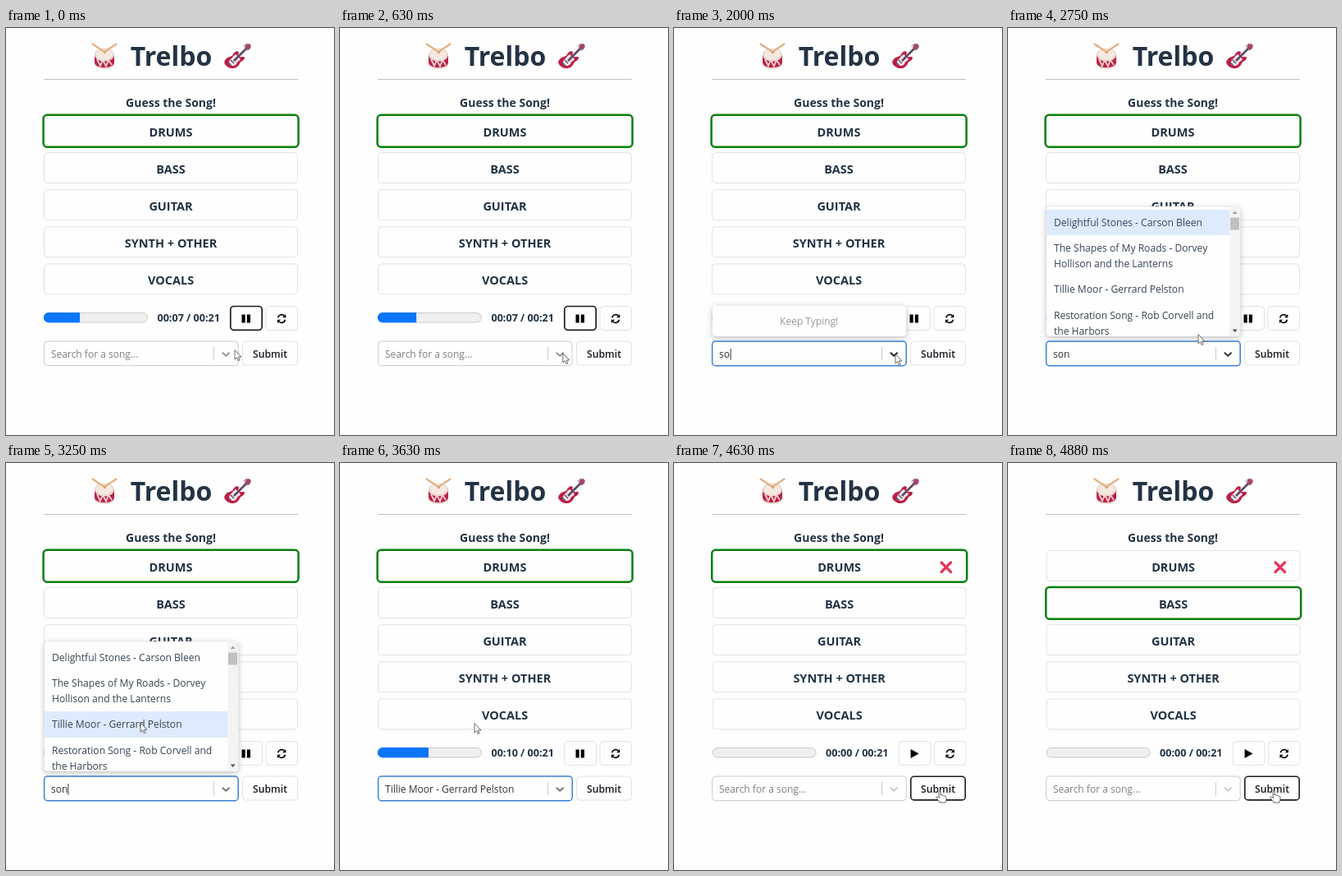
Animation, 400 px wide and 495 px high, one loop 5.01 s. Source, as an HTML page:

```html
<!DOCTYPE html>
<html lang="en">
<head>
<meta charset="utf-8">
<title>Guess the Song</title>
<style>
  html, body { margin: 0; height: 100%; overflow: hidden; background: #fefefe; }
  svg { display: block; width: 400px; height: 495px; font-family: "Open Sans", "Noto Sans", sans-serif; }
  .menu { filter: drop-shadow(0 2px 3px rgba(0, 0, 0, .22)); }
</style>
</head>
<body>
<svg id="stage" viewBox="0 0 400 495"></svg>
<script>
const LOOP = 5010, TICK = 125;
const OPEN = 750, LISTED = 2250, PICKED = 3625, SENT = 4375, NEXT = 4875;
const INK = '#233345', LINE = '#dfe2e5', BLUE = '#3a80d8';
const TRACKS = ['DRUMS', 'BASS', 'GUITAR', 'SYNTH + OTHER', 'VOCALS'];
const SONG = 'Tillie Moor - Gerrard Pelston';
const OPTIONS = [
  { y: 221, h: 31, lines: ['Delightful Stones - Carson Bleen'] },
  { y: 252, h: 50, lines: ['The Shapes of My Roads - Dorvey', 'Hollison and the Lanterns'] },
  { y: 302, h: 32, lines: [SONG] },
  { y: 334, h: 50, lines: ['Restoration Song - Rob Corvell and', 'the Harbors'] }
];
// time, x, y of the pointer tip
const PATH = [
  [0, 279, 392], [375, 277, 393], [750, 270, 397], [2250, 270, 397],
  [2750, 232, 373], [3125, 164, 316], [3625, 164, 317], [4250, 323, 399], [LOOP, 323, 399]
];

const rect = (x, y, w, h, fill, stroke = 'none', width = 1, r = 0) =>
  `<rect x="${x}" y="${y}" width="${w}" height="${h}" rx="${r}" fill="${fill}" stroke="${stroke}" stroke-width="${width}"/>`;
const box = (x, y, w, h, stroke = LINE, width = 1) => rect(x, y, w, h, '#fefefe', stroke, width, 4);
const path = (d, fill, stroke = 'none', width = 1, extra = '') =>
  `<path d="${d}" fill="${fill}" stroke="${stroke}" stroke-width="${width}" ${extra}/>`;
const text = (s, x, y, size, weight = 400, fill = INK, anchor = 'start') =>
  `<text x="${x}" y="${y}" font-size="${size}" font-weight="${weight}" fill="${fill}" text-anchor="${anchor}">${s}</text>`;
const ROUND = 'stroke-linecap="round" stroke-linejoin="round"';

const drum =
  path('M108 31V43C109 51 131 51 132 43V31Z', '#bd2145') +
  path('M111 38L115 46L118 39L122 46.5L125 39L129 45', 'none', '#efd3d3', 1.8) +
  path('M108 42C109 50 131 50 132 42V44C131 52 109 52 108 44Z', '#ead9d3') +
  '<ellipse cx="120" cy="32.5" rx="12" ry="8" fill="#ead9d3"/>' +
  '<ellipse cx="120" cy="32" rx="10.2" ry="6.5" fill="#f6e9df"/>' +
  path('M105.5 19.5L120 29M134.5 19.5L120 29', 'none', '#e3b184', 2.2, ROUND) +
  '<circle cx="120.5" cy="29.5" r="1.7" fill="#d9a273"/>';

const guitar =
  path('M268 38C271 34 275 36 277 32C279 28 283 27 284 30C283 32 283 34 285 35C288 36 290 34 291 36C291 40 286 40 285 43C283 49 275 51 270 47C266 44 265 41 268 38Z', '#be1d45') +
  path('M275 37C279 31 282 31 282 35C286 37 288 38 282 41.5C281 46 276 47 273 45C270 42 273 39 275 37Z', '#f1e6ea') +
  path('M278 40L293 25', 'none', '#5b4a69', 2.6) +
  path('M291 24L293 20L297 19L299 22L297 25L294 27Z', '#a8446c') +
  path('M271 42L275 46M274 39L278 43', 'none', '#5b4a69', 1.3) +
  path('M290 22L294 19M295 27L298 24', 'none', '#6b6078', 1, ROUND);

const header = drum + guitar +
  text('Trelbo', 201.5, 45.5, 32, 700, INK, 'middle') +
  rect(46, 62, 310, 1, '#bfc1c4') +
  text('Guess the Song!', 201, 96, 14, 700, INK, 'middle');

function trackList(t) {
  const active = t < NEXT ? 0 : 1;
  const y = i => 106.5 + i * 45.1;
  let out = TRACKS.map((name, i) =>
    (i === active ? rect(45.6, y(i) - .7, 311, 38.9, '#fefefe', '#087f0b', 2.5, 4.5)
                  : box(46.5, y(i), 309, 37)) +
    text(name, 201, y(i) + 25.3, 14.5, 700, INK, 'middle')).join('');
  if (t >= SENT) out += path('M325.5 121L337 132.5M337 121L325.5 132.5', 'none', '#e8365d', 3.2, ROUND);
  return out;
}

function player(t) {
  const sent = t >= SENT;
  const seconds = sent ? 0 : 7.4 + t * .00083;
  const fill = seconds / 21 * 125;
  const clock = String(Math.floor(seconds)).padStart(2, '0');
  return rect(46.5, 346.5, 126, 11.5, '#efefef', '#c9c9c9', 1, 5.7) +
    (sent ? '' : path(`M${46 + fill} 346H52A6 6 0 0 0 52 358.3H${46 + fill}Z`, '#0b76fb')) +
    text(`00:${clock} / 00:21`, 222.7, 357.2, 12.6, 700, INK, 'middle') +
    (t < OPEN ? box(273.8, 338.5, 38.4, 28.8, '#1c1c24', 1.7) : box(273.5, 338.5, 39, 29)) +
    (sent ? path('M288 348V359L298 353.5Z', '#000')
          : rect(287.5, 348.5, 4.2, 10, '#000') + rect(293.8, 348.5, 4.2, 10, '#000')) +
    box(317, 338.5, 38.5, 29) +
    path('M331.7 352.2A4.6 4.6 0 0 1 339.5 350M340.5 354.8A4.6 4.6 0 0 1 332.7 357', 'none', '#000', 1.7) +
    path('M341.3 348V352.2H337.1ZM330.9 359V354.8H335.1Z', '#000');
}

function form(t) {
  const focus = t >= OPEN && t < SENT;
  const typed = t < 1750 || t >= PICKED ? '' : t < 2000 ? 's' : t < LISTED ? 'so' : 'son';
  const value = t >= PICKED && t < SENT ? SONG : typed;
  const arrow = t < OPEN ? '#999' : t < 2500 ? '#222' : t < 3000 ? '#383838' : t < SENT ? '#777' : '#ccc';
  const lastKey = t < 1750 ? OPEN : t < 2000 ? 1750 : t < LISTED ? 2000 : LISTED;
  const caret = focus && t < PICKED && Math.floor((t - lastKey) / 500) % 2 === 0;
  return box(46.6, 381, 236.6, 29.7, focus ? BLUE : '#ccc', focus ? 1.5 : 1) +
    text(value || 'Search for a song...', 55, 401, 12, 400, value ? '#333' : '#808080') +
    (caret ? rect(55 + typed.length * 6.8, 390, 1, 13.5, '#333') : '') +
    rect(253, 388, 1, 16, '#ccc') +
    path('M264.4 395.2L268.2 398.8L272 395.2', 'none', arrow, 2, ROUND) +
    (t < SENT ? box(288.5, 381, 67, 29) : box(288.8, 381.3, 66.4, 28.6, '#1c1c24', 1.6)) +
    text('Submit', 322, 401, 12.2, 600, '#15191f', 'middle');
}

function menu(t, [x, y]) {
  if (t < OPEN || t >= PICKED) return '';
  if (t < LISTED)
    return `<g class="menu">${rect(46.5, 337, 237, 38, '#fefefe', '#ddd', .6, 4)}</g>` +
      text('Keep Typing!', 164.7, 361, 12, 400, '#999', 'middle');
  const over = y < 371 ? OPTIONS.findIndex(o => y >= o.y && y < o.y + o.h) : 0;
  const rows = OPTIONS.map((o, i) =>
    (i === over ? rect(47, o.y, 223.5, o.h, '#deebff') : '') +
    o.lines.map((s, n) => text(s, 56, o.y + 20.3 + n * 18.8, 12.1, 400, '#364454')).join('')).join('');
  return `<g class="menu">${rect(46.5, 217, 237, 158, '#fefefe', '#ddd', .6, 4)}</g>
    <clipPath id="list"><rect x="47" y="217.3" width="236.2" height="157.2" rx="3.5"/></clipPath>
    <g clip-path="url(#list)">${rows}${rect(270.5, 217, 13, 158, '#f3f3f3')}
    ${rect(271, 230.5, 11, 15, '#c1c1c1')}
    ${path('M273.7 226L276.7 222.5L279.7 226Z', '#a3a3a3')}
    ${path('M273.7 366.5L276.7 370L279.7 366.5Z', '#505050')}</g>`;
}

function pointerAt(t) {
  const i = PATH.findIndex(p => p[0] > t);
  const [t0, x0, y0] = PATH[i - 1], [t1, x1, y1] = PATH[i];
  const u = (t - t0) / (t1 - t0), e = u * u * (3 - 2 * u);
  return [x0 + (x1 - x0) * e, y0 + (y1 - y0) * e];
}

function pointer([x, y]) {
  const hand = x > 288 && y > 381;
  const d = hand
    ? 'M0 1C0-.5 2-.5 2 1V5C3 4 4.5 4.5 4.7 5.5C5.7 5 7 5.4 7.1 6.3C8.3 6 9 6.8 9 7.8V10C9 12 8 12.5 8 14H1C1 12.5-1 11-3 8.5C-3.5 7-2 6.5-1 7.5L0 8.5Z'
    : 'M0 0V11L2.5 8.7L4.3 12.6L6.1 11.8L4.3 8H7.6Z';
  return `<g transform="translate(${x} ${y})">${path(d, '#fff', '#555', .9, ROUND)}</g>`;
}

const stage = document.getElementById('stage');
let shown = -1;
function draw(now) {
  // the picture advances in ticks, each a few ms early so that it is ready on time
  const t = Math.floor((now % LOOP + 8) / TICK) * TICK;
  if (t !== shown) {
    shown = t;
    const at = pointerAt(t);
    stage.innerHTML = header +
      `<g transform="translate(${t < SENT ? 0 : .6} 0)">${trackList(t)}${player(t)}</g>` +
      form(t) + menu(t, at) + pointer(at);
  }
  requestAnimationFrame(draw);
}
draw(0);
</script>
</body>
</html>
```
